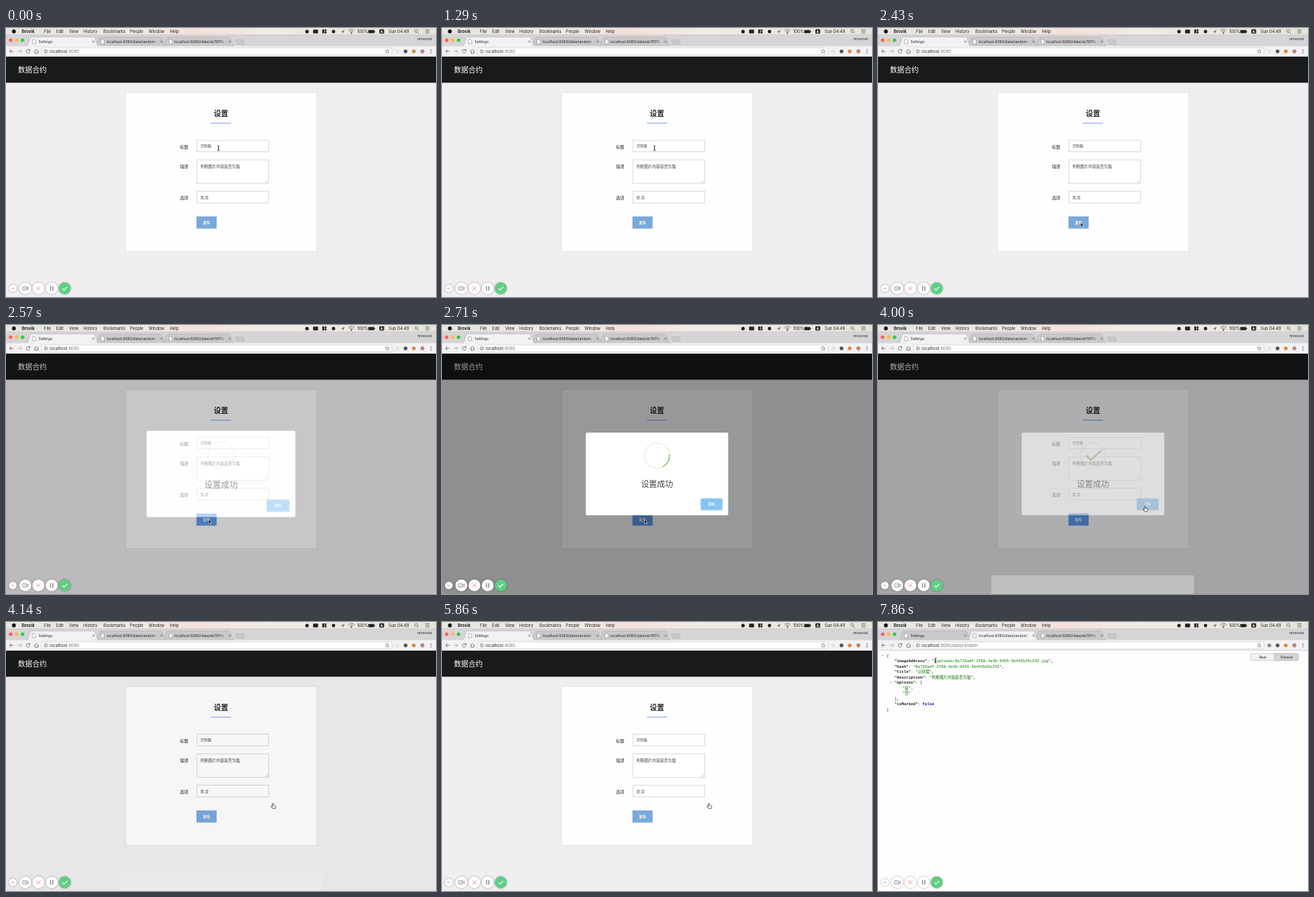
An HTML page that plays this animation: 600x375 px, repeating every 8 s.

```html
<!DOCTYPE html>
<html lang="zh">
<head>
<meta charset="utf-8">
<title>Settings</title>
<style>
html, body { margin: 0; width: 100%; height: 100%; overflow: hidden; background: #f0eef0; }
svg { display: block; width: 100%; height: 100%; }
text { font-family: Inter, "Noto Sans CJK SC", "Noto Sans CJK", sans-serif; fill: #222; white-space: pre; }
.menu { font-size: 5.75px; }
.tab { fill: #cbc8cb; stroke: #aaa7aa; stroke-width: .5; }
.tabs text { font-size: 5px; }
.form #tab1, .data #tab2 { fill: #f3f1f3; }
.form #data, .data #form { display: none; }
.line { fill: none; stroke: #666; stroke-width: .8; }
.field { fill: #fff; stroke: #d4d1d6; stroke-width: .7; filter: drop-shadow(0 .7px .5px #0002); }
.label { font-size: 5.8px; font-weight: 500; }
.value { font-size: 5px; fill: #444; }
.white { fill: #fff; font-weight: 700; text-anchor: middle; }
.round circle { fill: #fff; filter: drop-shadow(0 .6px 1px #0006); }
.round .line { stroke: #8a888a; }
.json text { font: 5.43px "Liberation Mono", "Noto Sans CJK SC", "Noto Sans CJK", monospace; }
.key { font-weight: 700; }
.str { fill: #0b7500; }
.bool { fill: #1a01cc; font-weight: 700; }
</style>
</head>
<body>
<svg id="stage" class="form" viewBox="0 0 600 375" preserveAspectRatio="none">
  <defs>
    <linearGradient id="fade"><stop offset="0" stop-color="#cbc8cb" stop-opacity="0"/><stop offset="1" stop-color="#cbc8cb"/></linearGradient>
    <linearGradient id="bar"><stop offset="0" stop-color="#e6e6e0"/><stop offset=".33" stop-color="#efe8e4"/><stop offset=".43" stop-color="#f5e0da"/><stop offset=".6" stop-color="#efebe5"/><stop offset="1" stop-color="#e5e4db"/></linearGradient>
    <path id="page-icon" d="M0 0h3l1.5 1.5V6H0z" fill="#fff" stroke="#888" stroke-width=".6"/>
    <path id="close" d="M-1.4-1.4 1.4 1.4M1.4-1.4-1.4 1.4" stroke="#666" stroke-width=".7"/>
  </defs>

  <!-- menu bar -->
  <rect width="600" height="9.5" fill="url(#bar)"/>
  <circle cx="11" cy="4.7" r="2.7" fill="#111"/>
  <g class="menu" id="menu"></g>
  <g fill="#222">
    <circle cx="420" cy="5" r="2.5"/>
    <rect x="428.5" y="2.2" width="7" height="5.3" rx=".8"/>
    <path d="M441.3 2h2.6v5.6h-2.6zM444.6 2h2.6v2.5h-2.6zM444.6 5.1h2.6v2.5h-2.6z"/>
    <circle cx="457" cy="5" r="2.4"/>
    <path d="M467 5.2l5.5-2.6-2.3 5.2-.6-2.2z" fill="#777"/>
    <path class="line" d="M477.7 3.7q4.3-3.5 8.6 0M479.3 5.4q2.7-2.2 5.4 0"/>
    <circle cx="482" cy="7" r=".9"/>
    <rect x="505.5" y="2.8" width="8.3" height="4.4" rx=".7"/><rect x="514.2" y="4" width=".8" height="2"/>
    <rect x="521" y="1.8" width="6.6" height="6" rx="1"/>
    <circle class="line" cx="572.5" cy="4.2" r="2"/><path class="line" d="M574 5.8l2 2"/>
    <path class="line" d="M585 2.5h6M585 4.7h6M585 6.9h6"/>
  </g>
  <text x="524.3" y="6.5" class="white" font-size="4.6">A</text>

  <!-- tab strip -->
  <rect y="9.5" width="600" height="16" fill="#d7d4d7"/>
  <path d="M0 9.5H600" stroke="#bcb9bc" stroke-width=".5"/>
  <circle cx="6.5" cy="17" r="2.5" fill="#fc605b"/><circle cx="14.8" cy="17" r="2.5" fill="#fdbc40"/><circle cx="23.1" cy="17" r="2.5" fill="#34c84a"/>
  <g class="tabs">
    <path id="tab3" class="tab" d="M218 25.5q2 0 3-3l2.6-8q.8-2 2.4-2h85q1.6 0 2.4 2l2.6 8q1 3 3 3"/>
    <path id="tab2" class="tab" d="M124 25.5q2 0 3-3l2.6-8q.8-2 2.4-2h84q1.6 0 2.4 2l2.6 8q1 3 3 3"/>
    <path id="tab1" class="tab" d="M28 25.5q2 0 3-3l2.6-8q.8-2 2.4-2h86q1.6 0 2.4 2l2.6 8q1 3 3 3"/>
    <use href="#page-icon" x="37" y="16"/><use href="#page-icon" x="132.5" y="16"/><use href="#page-icon" x="227.5" y="16"/>
    <text x="45.5" y="21">Settings</text>
    <text x="140.5" y="21">localhost:8080/data/random</text>
    <text x="235" y="21">localhost:8080/data/eb7817b</text>
    <rect x="298" y="15" width="11" height="8" fill="url(#fade)"/>
    <use href="#close" x="122" y="19"/><use href="#close" x="217" y="19"/><use href="#close" x="312" y="19"/>
    <path d="M320 16.5h10.5l2.5 6h-10.5z" class="tab"/>
    <text x="574" y="17.3">mirevost</text>
  </g>

  <!-- toolbar -->
  <rect y="25.5" width="600" height="14.5" fill="#f3f1f3"/>
  <path d="M0 39.7H600" stroke="#bbb8bb" stroke-width=".6"/>
  <path class="line" d="M10.5 32.5H5M7.7 29.8 5 32.5l2.7 2.7"/>
  <path class="line" style="stroke:#aaa" d="M16.5 32.5H22M19.3 29.8l2.7 2.7-2.7 2.7"/>
  <path class="line" d="M33 31.2a2.5 2.5 0 1 0 .3 2M33.5 29.5v2h-2"/>
  <path class="line" d="M39.5 32.6l3-2.7 3 2.7M40.5 32v3.2h4V32"/>
  <rect x="49.5" y="27.8" width="489" height="9.7" rx="1.2" fill="#fff" stroke="#c8c5c8" stroke-width=".6"/>
  <circle class="line" cx="55.5" cy="32.6" r="2.3"/><path class="line" d="M55.5 32.2v1.7M55.5 30.9v.6"/>
  <text x="61" y="34.7" font-size="5.8">localhost<tspan fill="#777" id="url"></tspan></text>
  <path class="line" style="stroke-width:.6" d="M532 29.7l.8 1.9 2 .2-1.5 1.4.5 2-1.8-1.1-1.8 1.1.5-2-1.5-1.4 2-.2z"/>
  <circle id="ext" cx="546" cy="32.6" r="2.6"/>
  <circle cx="557.5" cy="32.6" r="2.6" fill="#555"/><circle cx="569" cy="32.6" r="2.6" fill="#e0873c"/><circle cx="581" cy="32.6" r="2.8" fill="#b98586"/>
  <g fill="#555"><circle cx="593" cy="30.4" r=".7"/><circle cx="593" cy="32.6" r=".7"/><circle cx="593" cy="34.8" r=".7"/></g>

  <!-- settings form -->
  <g id="form">
    <rect y="40" width="600" height="335" fill="#f0eef0"/>
    <rect y="40" width="600" height="36.3" fill="#181a1b"/>
    <text x="16.7" y="61.8" font-size="10" style="fill:#fff">数据合约</text>
    <rect x="167" y="90" width="266.5" height="221.5" fill="#fefdff" stroke="#e2e0e3" stroke-width=".6" style="filter:drop-shadow(0 .6px .6px #0002)"/>
    <text x="290" y="123" font-size="10" font-weight="700">设置</text>
    <path d="M286 132.7H314" stroke="#7ba4ee"/>
    <text class="label" x="242.7" y="167.5">标题</text>
    <text class="label" x="242.7" y="195">描述</text>
    <text class="label" x="242.7" y="238.7">选项</text>
    <rect class="field" x="266.3" y="156.3" width="100" height="16.2"/>
    <rect class="field" x="266.3" y="184" width="100" height="32.7"/>
    <rect class="field" x="266.3" y="227.6" width="100" height="16.2"/>
    <path d="M362 215.7l3.3-3.3M364 215.7l1.3-1.3" stroke="#999" stroke-width=".5"/>
    <text class="value" x="271.3" y="166.3">识别猫</text>
    <text class="value" x="271.3" y="195.2" style="font-size:5.5px">判断图片内容是否为猫</text>
    <text class="value" x="271.3" y="237.7">是,否</text>
    <rect id="publish" x="265.8" y="262.7" width="28" height="16.8" rx=".6" style="filter:drop-shadow(0 .6px .6px #0003)"/>
    <text class="white" x="279.8" y="273" font-size="5">发布</text>

    <g id="overlay">
      <rect y="40" width="600" height="335" opacity=".4"/>
      <rect id="sheet" x="158" y="349" width="283" height="26" fill="#fff" opacity=".33"/>
      <g id="modal">
        <rect x="200.5" y="150" width="199" height="115.3" rx="2" fill="#fff"/>
        <g fill="none" stroke="#a5dc86" stroke-width="1.6">
          <circle cx="300" cy="182" r="17.6" opacity=".28"/>
          <path id="arc" stroke="#93c273"/>
          <path id="tick" d="M290.5 181.8 297 188.3 311.5 175" pathLength="1" stroke="#93c273" stroke-width="2" stroke-dasharray="1 2"/>
        </g>
        <text x="300" y="226.2" font-size="11.2" font-weight="500" text-anchor="middle" style="fill:#444">设置成功</text>
        <rect x="361" y="241.8" width="30.5" height="16.5" rx="2" fill="#86c4f1" stroke="#bfe1f6" stroke-width="1.2"/>
        <text class="white" x="376.2" y="252.2" font-size="6">OK</text>
      </g>
    </g>
  </g>

  <!-- JSON page -->
  <g id="data">
    <rect y="40" width="600" height="335" fill="#fefdfe"/>
    <g class="json" id="json"></g>
    <path d="M5 46h3l-1.5 2zM16.5 83.7h3l-1.5 2z" fill="#aaa"/>
    <rect x="520" y="44" width="66.5" height="9.7" rx="1.6" fill="#f3f1f3" stroke="#b5b2b5" stroke-width=".6"/>
    <path d="M553.3 44H585q1.5 0 1.5 1.6v6.5q0 1.6-1.5 1.6h-31.7z" fill="#d6d3d6" stroke="#b5b2b5" stroke-width=".6"/>
    <text x="536.7" y="50.7" font-size="5" text-anchor="middle">Raw</text>
    <text x="570" y="50.7" font-size="5" text-anchor="middle">Parsed</text>
  </g>

  <!-- recorder controls -->
  <g class="round">
    <circle cx="9.5" cy="363" r="5.3"/><circle cx="27" cy="363" r="8.3"/><circle cx="45.2" cy="363" r="8.3"/><circle cx="63.8" cy="363" r="8.3"/>
    <circle cx="82" cy="363" r="8.3" style="fill:#5ed082"/>
    <path class="line" d="M7.3 363h4.4M23 360.7h5.5v4.6H23zM28.5 362.5l2.7-1.4v3.8l-2.7-1.4M24.6 363h2.2"/>
    <path class="line" style="stroke:#e58a70" d="M42.2 360l6 6M48.2 360l-6 6"/>
    <path class="line" style="stroke:#777;stroke-width:1.2" d="M62.2 359.8v6.4M65.4 359.8v6.4"/>
    <path class="line" style="stroke:#fff;stroke-width:1.2" d="M78.7 363.2l2.3 2.3 4.5-4.7"/>
  </g>

  <!-- pointers, drawn around their hotspot -->
  <g id="pointer">
    <path id="ibeam" d="M-1.6-3.4q1.6 0 1.6 1V2.4q0 1-1.6 1M1.6-3.4q-1.6 0-1.6 1V2.4q0 1 1.6 1M-.8.9H.8" fill="none" stroke="#222" stroke-width=".7"/>
    <path id="arrow" d="M0 0V6l1.4-1.2.9 2.1 1-.4-.9-2.1h1.8z" fill="#111" stroke="#fff" stroke-width=".5"/>
    <path id="hand" d="M-.7.5q.7-.8 1.3 0l.2 2.3 2.6.7q.7.3.5 1.3l-.7 2.7H-.3L-2.5 4.6q0-.9.9-.6l.9.7z" fill="#fff" stroke="#222" stroke-width=".7"/>
  </g>
</svg>
<script>
const LOOP = 8000, FPS = 7, OPEN = 2434, CLOSE = 3958, SWITCH = 6500;
const $ = id => document.getElementById(id);
const clamp = v => Math.max(0, Math.min(1, v));
const span = (t, from, to) => clamp((t - from) / (to - from));
const ease = p => p * p * (3 - 2 * p);
const easeOut = p => 1 - (1 - p) ** 3;

const menu = [[22, 'Brovik'], [53, 'File'], [70, 'Edit'], [88, 'View'], [108, 'History'], [136, 'Bookmarks'],
  [173, 'People'], [199, 'Window'], [228.5, 'Help'], [490, '100%'], [534, 'Sun 04:49']];
$('menu').innerHTML = menu.map(([x, s], i) =>
  `<text x="${x}" y="6.8"${i ? '' : ' font-weight="700"'}>${s}</text>`).join('');

const key = k => `<tspan class="key">"${k}"</tspan>: `;
const str = s => `<tspan class="str">"${s}"</tspan>`;
const uuid = '8a726adf-2f88-4a36-9455-5b442b29c242';
const lines = [[12, '{'],
  [23, key('imageAddress') + str(`/uploads/${uuid}.jpg`) + ','],
  [23, key('hash') + str(uuid) + ','],
  [23, key('title') + str('识别猫') + ','],
  [23, key('description') + str('判断图片内容是否为猫') + ','],
  [23, key('options') + '['],
  [34, str('是') + ','],
  [34, str('否')],
  [23, '],'],
  [23, key('isMarked') + '<tspan class="bool">false</tspan>'],
  [12, '}']];
$('json').innerHTML = lines.map(([x, s], i) => `<text x="${x}" y="${48.7 + i * 7.5}">${s}</text>`).join('');

// time, x, y of the pointer
const path = [[0, 296.5, 167.7], [1300, 296.5, 167.7], [2150, 282.7, 271], [3000, 282.7, 271], [3600, 372.4, 252.6],
  [5900, 372.4, 252.6], [6400, 175, 19], [6600, 175, 19], [7300, 80.2, 53.8], [LOOP, 80.2, 53.8]];

function pointerAt(t) {
  const i = path.findIndex((p, n) => n && t <= p[0]);
  const [t0, x0, y0] = path[i - 1], [t1, x1, y1] = path[i];
  const p = ease(span(t, t0, t1));
  return [x0 + (x1 - x0) * p, y0 + (y1 - y0) * p];
}

function pointerKind(t, x, y) {
  if (t >= SWITCH) return y > 50 && x < 245 ? 'ibeam' : 'arrow';
  if (t > OPEN) return x > 361 && y > 242 ? 'hand' : 'arrow';
  const inField = [[156, 173], [184, 217], [227, 244]].some(([a, b]) => y > a && y < b);
  return inField ? 'ibeam' : 'arrow';
}

// grow past full size, dip, settle
function popScale(p) {
  if (p < .45) return .5 + .55 * easeOut(p / .45);
  if (p < .8) return 1.05 - .1 * easeOut((p - .45) / .35);
  return .95 + .05 * easeOut((p - .8) / .2);
}

function arcPath(from, to) {
  if (to - from < 1) return '';
  const at = deg => {
    const a = deg * Math.PI / 180;
    return `${300 + 17.6 * Math.cos(a)} ${182 + 17.6 * Math.sin(a)}`;
  };
  return `M${at(from)}A17.6 17.6 0 0 1 ${at(to)}`;
}

function render(t) {
  const onForm = t < SWITCH;
  $('stage').setAttribute('class', onForm ? 'form' : 'data');
  $('url').textContent = onForm ? ':8080' : ':8080/data/random';
  $('ext').setAttribute('fill', onForm ? '#e6e3e6' : '#8a888a');

  const age = t - OPEN, open = age > 0 && t < CLOSE + 200;
  $('overlay').style.display = open ? '' : 'none';
  $('publish').setAttribute('fill', open && t < 4100 ? '#5f9cf0' : '#79a9da');
  if (open) {
    $('overlay').setAttribute('opacity', ease(span(age, 0, 260)) * (1 - span(t, CLOSE, CLOSE + 200)));
    $('modal').setAttribute('opacity', 1 - span(t, CLOSE, CLOSE + 105));
    $('sheet').style.display = t > CLOSE ? '' : 'none';
    const s = popScale(clamp(age / 300));
    $('modal').setAttribute('transform', `translate(300 207.6) scale(${s}) translate(-300 -207.6)`);
    const turn = 360 * span(age, 224, 522);
    $('arc').setAttribute('d', arcPath(Math.max(-118, 62 - turn), Math.min(62, 242 - turn)));
    const drawn = span(age, 400, 640);
    $('tick').style.display = drawn ? '' : 'none';
    $('tick').setAttribute('stroke-dashoffset', 1 - drawn);
  }

  const [x, y] = pointerAt(t), kind = pointerKind(t, x, y);
  $('pointer').setAttribute('transform', `translate(${x} ${y})`);
  for (const k of ['ibeam', 'arrow', 'hand']) $(k).style.display = k === kind ? '' : 'none';
}

const start = performance.now();
function tick() {
  const t = (performance.now() - start) % LOOP;
  render(Math.floor((t + 5) * FPS / 1000) * 1000 / FPS % LOOP);
  requestAnimationFrame(tick);
}
tick();
</script>
</body>
</html>
```
